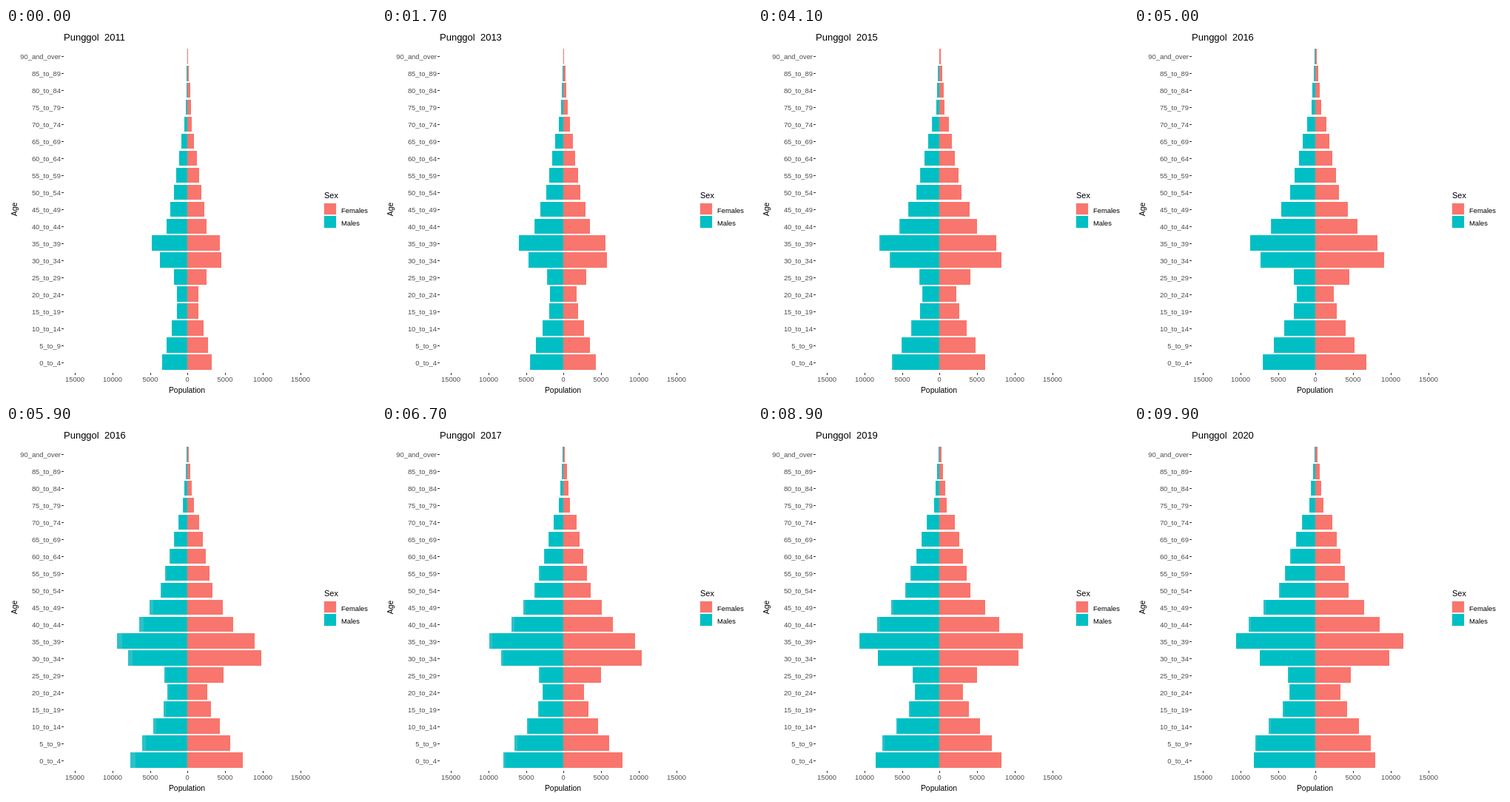
Write an HTML page that moves like this. It is 500 px wide and 500 px high and loops after 10000 ms.

```html
<!DOCTYPE html>
<html lang="en">
<head>
<meta charset="utf-8">
<title>Population pyramid</title>
<style>
  html, body { margin: 0; width: 100%; height: 100%; overflow: hidden; background: #fff; }
  svg { display: block; width: 500px; height: 500px; font-family: "Liberation Sans", Arial, sans-serif; }
  rect { shape-rendering: crispEdges; }
  .female { fill: #f8766d; }
  .male { fill: #00bfc4; }
  .fresh { fill: #2bc1c8; }
  .tick { fill: #333; }
  .key { fill: #f2f2f2; }
  .label { font-size: 9.4px; fill: #4d4d4d; }
  .mid { text-anchor: middle; }
  .end { text-anchor: end; }
  #title { font-size: 13px; white-space: pre; }
</style>
</head>
<body>
<svg id="chart" viewBox="0 0 500 500">
  <text id="title" x="78" y="17"></text>
  <text class="mid" x="244.5" y="493" font-size="10.4">Population</text>
  <text class="mid" transform="translate(14.5 245) rotate(-90)" font-size="10.4">Age</text>
  <text x="430" y="230" font-size="11">Sex</text>
  <rect class="key" x="429" y="236" width="18" height="35"/>
  <rect class="female" x="430" y="237" width="16" height="15"/>
  <rect class="male" x="430" y="254" width="16" height="16"/>
  <text x="453" y="250" font-size="9.4">Females</text>
  <text x="453" y="267" font-size="9.4">Males</text>
</svg>
<script>
const chart = document.getElementById('chart');
const title = document.getElementById('title');
const ZERO = 245, STEP_MS = 100, STEPS = 100, STEPS_PER_YEAR = 11;

// Corners of the age profile: bar lengths in pixels, [first year, last year]
const profile = [
  { age: 0, female: [33, 81], male: [34, 83] },
  { age: 5, female: [28, 75], male: [28, 81] },
  { age: 15, female: [15, 43], male: [14, 44] },
  { age: 20, female: [15, 34], male: [14, 35] },
  { age: 25, female: [26, 48], male: [18, 37] },
  { age: 30, female: [46, 100], male: [37, 75] },
  { age: 35, female: [44, 119], male: [48, 107] },
  { age: 40, female: [26, 87], male: [28, 90] },
  { age: 50, female: [19, 45], male: [18, 49] },
  { age: 70, female: [6, 23], male: [4, 18] },
  { age: 75, female: [5, 11], male: [2, 8] },
  { age: 90, female: [1, 3], male: [0, 1] }
];
// Age at which each sex's mid-period surge is strongest
const surgeAge = { female: 28.8, male: 31.6 };

const mix = (a, b, t) => a + (b - a) * t;

function lengthAt(sex, age, step) {
  const t = step / (STEPS - 1);
  const next = Math.max(1, profile.findIndex(point => point.age >= age));
  const a = profile[next - 1], b = profile[next];
  const along = (age - a.age) / (b.age - a.age);
  const base = mix(mix(...a[sex], t), mix(...b[sex], t), along);
  // Young adults and infants rise early, then fall back
  const adults = 170 * Math.exp(-(((age - surgeAge[sex]) / 4) ** 2));
  const infants = 95 * Math.exp(-age / 2.5);
  return Math.round(base + (adults + infants) * t * t * (1 - t));
}

function add(tag, attrs, text) {
  const el = document.createElementNS('http://www.w3.org/2000/svg', tag);
  for (const name in attrs) el.setAttribute(name, attrs[name]);
  if (text !== undefined) el.textContent = text;
  return chart.appendChild(el);
}

function span(el, x, width) {
  el.setAttribute('x', x);
  el.setAttribute('width', width);
}

const rows = [];
for (let i = 0; i < 19; i++) {
  const age = (18 - i) * 5;
  const mark = 38 + 23 * i;
  const y = Math.floor(28.52 + 22.95 * i);
  const height = Math.floor(49.07 + 22.95 * i) - y;
  const bar = cls => add('rect', { class: cls, y, height });
  add('text', { class: 'label end', x: 74, y: mark + 4 },
    age < 90 ? `${age}_to_${age + 4}` : '90_and_over');
  add('rect', { class: 'tick', x: 75, y: mark, width: 3, height: 1 });
  rows.push({ age, fresh: bar('fresh'), left: bar('male'), right: bar('female') });
}

for (let n = -3; n <= 3; n++) {
  const x = Math.round(ZERO + 0.4 + n * 50.85);
  add('rect', { class: 'tick', x, y: 466, width: 1, height: 3 });
  add('text', { class: 'label mid', x, y: 478 }, Math.abs(n) * 5000);
}

function draw(step) {
  const year = Math.round(step / STEPS_PER_YEAR);
  // Growth since the year label changed is tinted a little lighter
  const yearStart = Math.max(0, (year - 0.5) * STEPS_PER_YEAR);
  title.textContent = `Punggol  ${2011 + year}`;
  for (const { age, fresh, left, right } of rows) {
    const men = lengthAt('male', age, step);
    const settled = Math.min(men, lengthAt('male', age, yearStart));
    span(right, ZERO, lengthAt('female', age, step));
    span(fresh, ZERO - men, men);
    span(left, ZERO - settled, settled);
  }
}

let shown = -1;
const start = performance.now();
function tick() {
  const step = Math.floor((performance.now() - start) / STEP_MS) % STEPS;
  if (step !== shown) draw(shown = step);
  requestAnimationFrame(tick);
}
tick();
</script>
</body>
</html>
```
